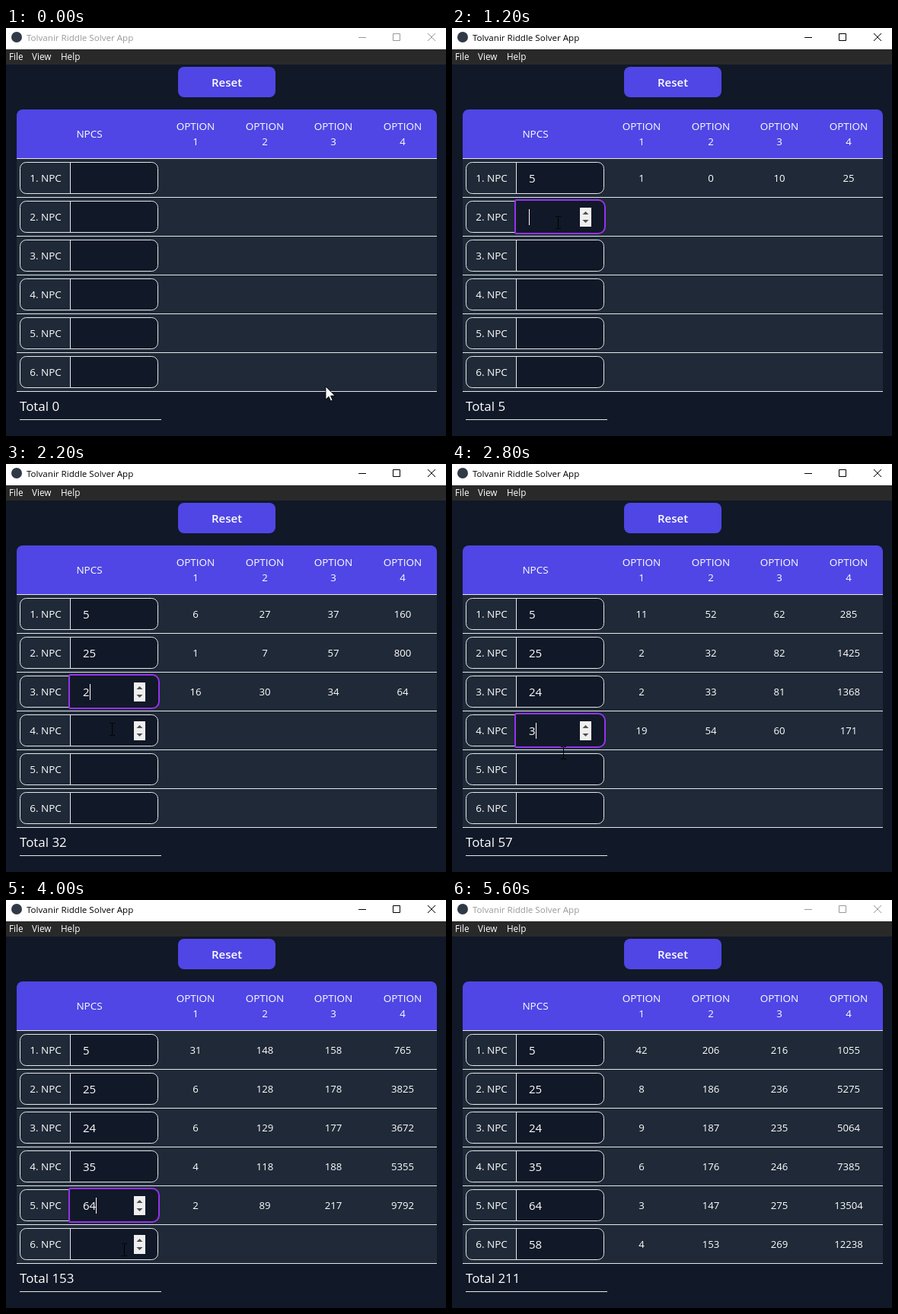
An HTML page with a canvas that plays this animation: 578 px wide and 536 px high, repeating every 5.7 s.

```html
<!DOCTYPE html>
<html lang="en">
<head>
<meta charset="utf-8">
<title>Puzzle solver</title>
<style>
  html, body { margin: 0; width: 100%; height: 100%; overflow: hidden; background: #111827; }
  canvas { display: block; }
</style>
</head>
<body>
<canvas id="stage" width="578" height="536"></canvas>
<script>
const ctx = document.getElementById('stage').getContext('2d');
const LOOP = 5700, STEP = 100, BLINK = 530, BLUR_AT = 5600;
const FONT = '"Open Sans", "Noto Sans", sans-serif';
const DARK = '#111827', ROW = '#1f2937', INDIGO = '#4f46e5', LINE = '#e5e7eb', RING = '#9333ea';
const COLUMNS = [249, 340, 430, 521];
const rowTop = row => 172 + row * 51;

// [time, row, text]: empty text means the field receives focus
const EVENTS = [
  [700, 0, ''], [900, 0, '5'],
  [1100, 1, ''], [1400, 1, '2'], [1500, 1, '25'],
  [1900, 2, ''], [2200, 2, '2'], [2400, 2, '24'],
  [2600, 3, ''], [2800, 3, '3'], [3000, 3, '35'],
  [3300, 4, ''], [3800, 4, '6'], [4000, 4, '64'],
  [4200, 5, ''], [4400, 5, '5'], [4500, 5, '58']
];

// [time, x, y] of the pointer hot spot
const PATH = [
  [0, 420, 471], [600, 140, 203], [900, 140, 203], [1100, 139, 255],
  [1400, 139, 255], [1800, 139, 298], [1950, 139, 298], [2200, 139, 348],
  [2600, 141, 352], [2800, 146, 379], [3200, 150, 405], [3600, 150, 405],
  [4000, 155, 459], [4600, 155, 462], [4800, 155, 462], [5100, 170, 545]
];

function fill(x, y, w, h, color, radius = 0) {
  ctx.fillStyle = color;
  ctx.beginPath();
  ctx.roundRect(x, y, w, h, radius);
  ctx.fill();
}

function outline(x, y, w, h, color, radius = 0, width = 1) {
  ctx.strokeStyle = color;
  ctx.lineWidth = width;
  ctx.beginPath();
  ctx.roundRect(x, y, w, h, radius);
  ctx.stroke();
}

function polygon(color, ...points) {
  ctx.fillStyle = color;
  ctx.beginPath();
  points.forEach(([x, y]) => ctx.lineTo(x, y));
  ctx.closePath();
  ctx.fill();
}

function text(value, x, y, size, { color = '#fff', align = 'left', weight = 400 } = {}) {
  ctx.font = `${weight} ${size}px ${FONT}`;
  ctx.fillStyle = color;
  ctx.textAlign = align;
  ctx.fillText(value, x, y);
  return ctx.measureText(value).width;
}

const centered = (value, x, y, size, weight) => text(value, x, y, size, { align: 'center', weight });

function stateAt(time) {
  const state = { values: Array(6).fill(''), focus: -1, active: false, last: 0 };
  for (const [at, row, value] of EVENTS) {
    if (at > time) break;
    state.values[row] = value;
    Object.assign(state, { focus: row, active: true, last: at });
  }
  if (time >= BLUR_AT) Object.assign(state, { focus: -1, active: false });
  state.total = state.values.reduce((sum, v) => sum + Number(v), 0);
  return state;
}

function pointerAt(time) {
  const next = PATH.findIndex(([at]) => at > time);
  if (next < 0) return { x: 170, y: 545 };
  const [t0, x0, y0] = PATH[next - 1], [t1, x1, y1] = PATH[next];
  const p = (time - t0) / (t1 - t0), eased = p * p * (3 - 2 * p);
  return { x: x0 + (x1 - x0) * eased, y: y0 + (y1 - y0) * eased };
}

function drawWindow(active) {
  fill(0, 0, 578, 536, DARK);
  fill(0, 0, 578, 28, '#fff');
  fill(7, 5, 14, 14, '#303a47', 7);
  text('Tolvanir Riddle Solver App', 27, 17, 11.6, { color: active ? '#000' : '#999' });

  const color = active ? '#000' : '#999';
  fill(463, 12, 10, 1, color);
  outline(508.5, 7.5, 9, 9, color);
  ctx.beginPath();
  ctx.moveTo(554, 7); ctx.lineTo(564, 17);
  ctx.moveTo(564, 7); ctx.lineTo(554, 17);
  ctx.stroke();

  fill(0, 28, 578, 20, '#292929');
  [['File', 4], ['View', 34], ['Help', 72]].forEach(([label, x]) => text(label, x, 42, 11.7));
}

function drawHeader() {
  fill(226, 51, 128, 40, INDIGO, 8);
  centered('Reset', 290, 77, 15, 600);
  fill(14, 107, 552, 64, INDIGO, [8, 8, 0, 0]);
  centered('NPCS', 109.5, 144, 13.5);
  COLUMNS.forEach((x, i) => {
    centered('OPTION', x, 134, 13.5);
    centered(i + 1, x, 154, 13.3);
  });
  fill(14, 171, 552, 1, LINE);
}

function drawSpinner(top) {
  fill(168, top + 13, 15, 25, '#efefef');
  polygon('#505050', [171.5, top + 22], [175.5, top + 18], [179.5, top + 22]);
  polygon('#505050', [171.5, top + 29], [175.5, top + 33], [179.5, top + 29]);
}

function drawRow(row, state, pointer, time) {
  const top = rowTop(row), value = state.values[row], focused = state.focus === row;
  fill(14, top, 552, 50, ROW);
  fill(14, top + 50, 552, 1, LINE);
  fill(85, top + 4, 115, 42, DARK, [0, 8, 8, 0]);
  outline(18.5, top + 4.5, 181, 41, LINE, 8);
  fill(84, top + 4, 1, 42, LINE);
  centered(`${row + 1}. NPC`, 52, top + 30, 13.5);

  if (focused) {
    fill(83, top + 3, 118, 44, DARK, [2, 9, 9, 2]);
    outline(83, top + 3, 118, 44, RING, [2, 9, 9, 2], 2);
  }
  const width = text(value, 101, top + 31, 15);
  const hovered = pointer.x > 84 && pointer.x < 200 && pointer.y >= top + 4 && pointer.y < top + 46;
  if (focused || hovered) drawSpinner(top);
  if (focused && Math.floor((time - state.last) / BLINK) % 2 === 0) {
    fill(Math.round(101 + width), top + 15, 1, 21, '#fff');
  }

  if (value) {
    const v = Number(value), total = state.total;
    [Math.round(total / v), total - v, total + v, total * v]
      .forEach((result, i) => centered(result, COLUMNS[i], top + 30, 13.2));
  }
}

function drawPointer({ x, y }) {
  ctx.save();
  ctx.translate(Math.round(x), Math.round(y));
  if (x > 84 && x < 200 && y > 175 && y < 474) {
    fill(0, -7, 1, 15, '#000');
    fill(-3, -8, 3, 1, '#000');
    fill(1, -8, 3, 1, '#000');
    fill(-3, 8, 3, 1, '#000');
    fill(1, 8, 3, 1, '#000');
  } else {
    polygon('#fff', [0, 0], [0, 17], [4, 13.2], [6.6, 19], [9, 18], [6.5, 12.2], [12, 12]);
    ctx.strokeStyle = '#000';
    ctx.lineWidth = 0.8;
    ctx.stroke();
  }
  ctx.restore();
}

function draw(time) {
  const state = stateAt(time), pointer = pointerAt(time);
  drawWindow(state.active);
  drawHeader();
  state.values.forEach((_, row) => drawRow(row, state, pointer, time));
  text(`Total ${state.total}`, 18, 503, 16.9);
  fill(18, 514, 186, 1, LINE);
  drawPointer(pointer);
}

const start = performance.now();
function tick() {
  const elapsed = (performance.now() - start) % LOOP;
  draw(Math.floor(elapsed / STEP) * STEP);
  requestAnimationFrame(tick);
}
tick();
</script>
</body>
</html>
```
